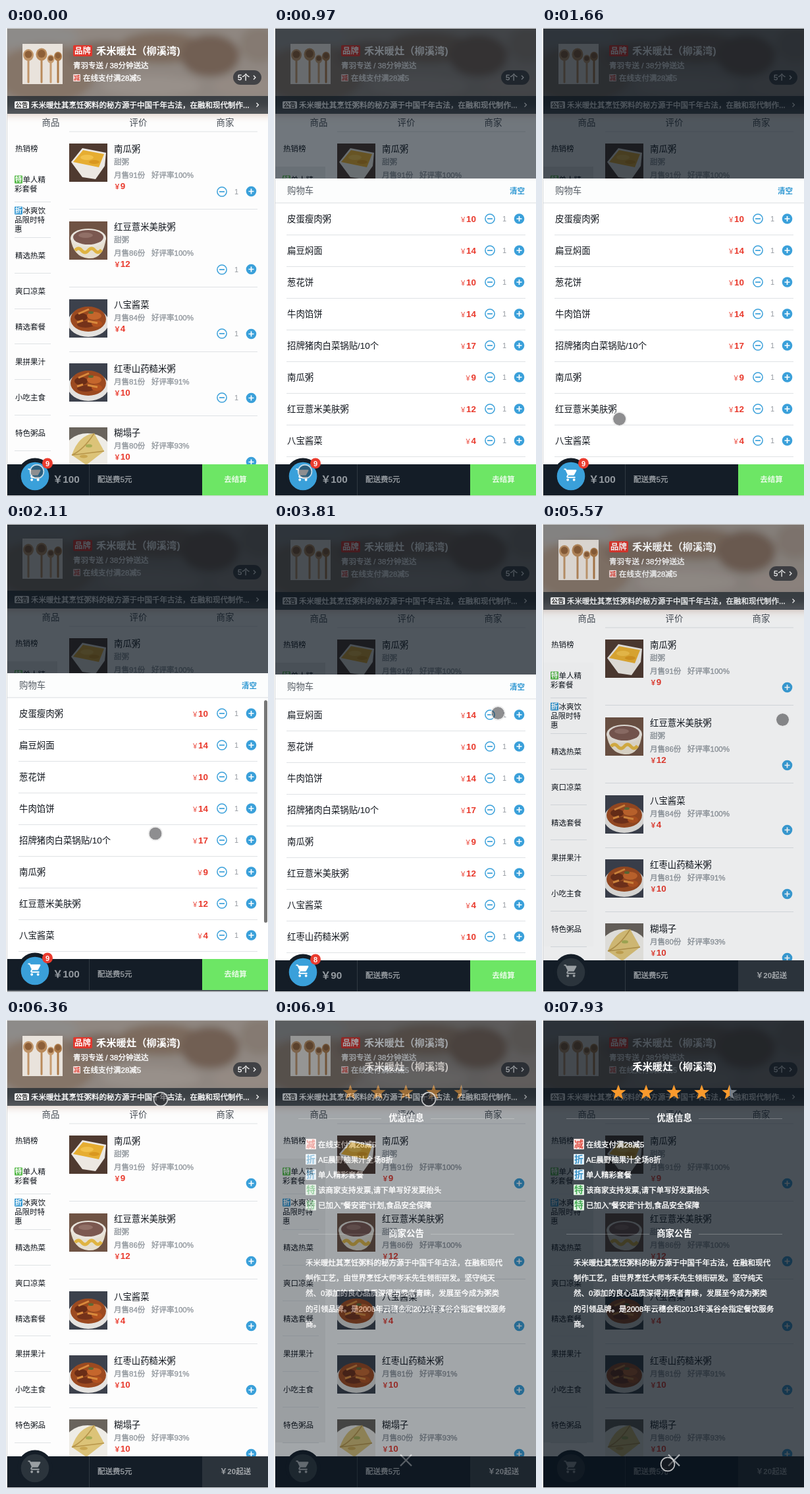
Animation, 398 px wide and 709 px high, one loop 7990 ms. Source, as an HTML page:

```html
<!DOCTYPE html>
<html lang="zh-CN">
<head>
<meta charset="utf-8">
<title>点餐购物车</title>
<style>
html,body{margin:0;width:100%;height:100%;overflow:hidden;background:#fff}
svg{display:block;width:100vw;height:100vh}
text{font-family:"Liberation Sans","Noto Sans CJK SC","Noto Sans CJK",sans-serif;white-space:pre}
</style>
</head>
<body>
<svg id="stage" viewBox="0 0 398 709"></svg>
<script>
const LOOP = 7990;
const BLUE = '#3aa0da', RED = '#e93a2d', INK = '#10151c', GREY = '#93999f', BAR = '#141d27';
const S = 11.5, M = 13.4, L = 15.3;
const SHOP = '禾米暖灶', NAME = SHOP + '（柳溪湾)';

// y is the vertical middle of the glyphs; weight 500 is thickened by a thin outline
const text = (x, y, str, size, fill, weight = 400, extra = '') =>
  `<text x="${x}" y="${(y + size * .37).toFixed(2)}" font-size="${size}" fill="${fill}" font-weight="${weight}" ${weight === 500 ? `stroke="${fill}" stroke-width=".38"` : ''} ${extra}>${str}</text>`;
const mid = (x, y, str, size, fill, weight) => text(x, y, str, size, fill, weight, 'text-anchor="middle"');
const rect = (x, y, w, h, fill, extra = '') => `<rect x="${x}" y="${y}" width="${w}" height="${h}" fill="${fill}" ${extra}/>`;
const line = (x1, x2, y, stroke = '#dfe2e5') => `<path d="M${x1} ${y + .5}H${x2}" stroke="${stroke}"/>`;
const disc = (x, y, r, fill, extra = '') => `<circle cx="${x}" cy="${y}" r="${r}" fill="${fill}" ${extra}/>`;
const oval = (x, y, rx, ry, fill, extra = '') => `<ellipse cx="${x}" cy="${y}" rx="${rx}" ry="${ry}" fill="${fill}" ${extra}/>`;
const group = (id, body, extra = '') => `<g id="${id}" ${extra}>${body}</g>`;
const chevron = (x, y) => `<path d="M${x} ${y - 3}l3 3-3 3" fill="none" stroke="#fff" stroke-width="1.2"/>`;

const plus = y => disc(372.5, y, 7.8, BLUE) + `<path d="M368.5 ${y}h8M372.5 ${y - 4}v8" stroke="#fff" stroke-width="1.7"/>`;
const minus = y => disc(328, y, 7.1, 'none', `stroke="${BLUE}" stroke-width="1.5"`) +
  `<path d="M324 ${y}h8" stroke="${BLUE}" stroke-width="1.7"/>` + mid(350, y, '1', 11, GREY);
const price = (x, y, n, anchor = 'start', weight = 700) =>
  text(x, y, `<tspan font-size="9.8" font-weight="${weight}">￥</tspan>${n}`, M, RED, 700, `text-anchor="${anchor}"`);
const tag = (x, y, size, ch, fill, ink) => rect(x, y, size, size, fill, 'rx="1"') + mid(x + size / 2, y + size / 2, ch, size * .86, ink, 700);

function spoons() {
  const spoon = (x, y, r, c) => `<path d="M${x} ${y}V82" stroke="${c}" stroke-width="3" stroke-linecap="round"/>` +
    oval(x, y, r, r + 1, c) + oval(x, y - 1, r * .68, r * .7, '#8d5f38');
  return rect(25, 24, 61, 61, '#e9e3dc') + spoon(34, 41, 8, '#c09468') + spoon(54, 40, 8.5, '#b98a5b') +
    spoon(68, 47, 5.5, '#c79c70') + spoon(79, 43, 6, '#ad7a48');
}

function header() {
  const blobs = [[30, 12, 80, 18, '#8d8b89'], [60, 70, 75, 45, '#857568'], [150, 42, 55, 22, '#78685d'], [235, 30, 65, 24, '#7c6a5d'],
    [310, 42, 45, 32, '#715f53'], [220, 88, 75, 16, '#98908a'], [385, 25, 30, 28, '#857a72'], [365, 88, 50, 14, '#948a83']];
  return `<g filter="url(#soft)">` + rect(-20, -20, 440, 144, '#8f8781') + rect(-20, 122, 440, 11, '#e6d6cd') +
    blobs.map(b => oval(...b)).join('') + '</g>' + spoons() +
    rect(102, 26, 29, 17, '#e0372d', 'rx="2"') + mid(116.5, 34.5, '品牌', 12.4, '#fff', 700) +
    text(137, 34.5, NAME, L, '#fff', 700) +
    text(102, 57, '青羽专送 / 38分钟送达', S, '#fff', 500) +
    tag(102, 70, 11, '减', '#f3dedb', '#e0483c') + text(117, 76, '在线支付满28减5', S, '#fff', 500) +
    rect(345, 64, 43, 22, '#07111b', 'rx="11" opacity=".58"') + text(352, 75, '5个', S, '#fff', 500) + chevron(376, 75) +
    rect(2, 103, 396, 27, '#1b242d', 'opacity=".72"') + rect(13, 111, 22, 11, '#f4f4f4', 'rx="1.5"') + mid(24, 116.5, '公告', 9.4, '#333', 700) +
    text(38, 116.5, SHOP + '其烹饪粥料的秘方源于中国千年古法，在融和现代制作...', S, '#fff', 500) + chevron(380.5, 116.5);
}

const pictures = {
  pumpkin: () => rect(0, 0, 58, 58, '#4f3a30') + `<path d="M3 28L20 7 56 14 54 34 40 54 20 51Z" fill="#ece8e2"/>` +
    `<path d="M6 28L21 10 53 16 45 36Z" fill="#e6ad31"/>` + oval(27, 21, 10, 4, '#f2c14a') + oval(38, 28, 8, 3, '#d9971f'),
  bean: () => rect(0, 0, 58, 58, '#6f5344') + `<path d="M2 25Q6 54 29 56T56 25Z" fill="#e6dfd0"/>` + oval(29, 25, 27, 14, '#e9e4dc') +
    oval(29, 24, 23, 11, '#7b5850') + oval(25, 21, 11, 4, '#917067') + `<path d="M9 44q5-6 10 0t10 0 10 0 10-1" fill="none" stroke="#dfb443" stroke-width="5"/>`,
  stew: () => rect(0, 0, 58, 58, '#3c414c') + oval(29, 35, 31, 22, '#e4e2df') + oval(29, 30, 27, 19, '#9c4a20') +
    oval(18, 27, 10, 6, '#6a2d17') + oval(38, 25, 11, 6, '#c5662c') + oval(25, 38, 13, 5, '#74321a') + oval(42, 37, 8, 5, '#b3521f') +
    `<path d="M14 22l16-7M28 33l15 3M12 35l9-3" stroke="#d98a3c" stroke-width="3"/>` + oval(33, 20, 4, 2, '#5d6b35'),
  pancake: () => rect(0, 0, 58, 58, '#69635c') + oval(28, 40, 37, 31, '#eeece6') + `<path d="M4 42Q14 12 38 9L53 36 26 57Z" fill="#dcc378"/>` +
    `<path d="M4 42Q22 34 38 9M4 42L53 36" fill="none" stroke="#b7954a" stroke-width="1.5"/>` + oval(30, 28, 5, 2.5, '#a7ad55') + oval(22, 44, 6, 2.5, '#c9a651')
};
const foods = [
  [175, '南瓜粥', '甜粥', 91, 100, 9, 'pumpkin'], [293, '红豆薏米美肤粥', '甜粥', 86, 100, 12, 'bean'],
  [411, '八宝酱菜', '', 84, 100, 4, 'stew'], [508, '红枣山药糙米粥', '', 81, 91, 10, 'stew'], [605, '糊塌子', '', 80, 93, 10, 'pancake']];
const foodRow = ([y, name, desc, sold, rate, cost, pic]) => {
  const d = desc ? 20 : 0;
  return `<svg x="96" y="${y}" width="58" height="58" style="width:58px;height:58px">${pictures[pic]()}</svg>` + text(164, y + 8.5, name, M, INK) +
    (desc && text(164, y + 27.5, desc, S, GREY, 500)) + text(164, y + 27.5 + d, `月售${sold}份`, S, GREY, 500) +
    text(221, y + 27.5 + d, `好评率${rate}%`, S, GREY, 500) + price(164, y + 44.5 + d, cost) + plus(y + 52.5 + d) + line(96, 382, y + 79 + d);
};

function sidebar() {
  const plain = ['精选热菜', '爽口凉菜', '精选套餐', '果拼果汁', '小吃主食', '特色粥品'];
  const t = (x, y, s) => text(x, y, s, S, INK);
  return group('shade', rect(2, 210, 76, 430, BAR)) + t(14, 183, '热销榜') +
    tag(13, 223.5, 12, '特', '#56b949', '#fff') + t(25.5, 230, '单人精') + t(13, 244, '彩套餐') + line(13, 68, 263) +
    tag(13, 270.5, 12, '折', '#3a9bd3', '#fff') + t(25.5, 277, '冰爽饮') + t(13, 291, '品限时特') + t(13, 304.5, '惠') + line(13, 68, 317) +
    plain.map((s, i) => t(14, 345 + i * 53.7, s) + line(13, 68, Math.round(371 + i * 53.7))).join('');
}

const order = [['皮蛋瘦肉粥', 10], ['扁豆焖面', 14], ['葱花饼', 10], ['牛肉馅饼', 14], ['招牌猪肉白菜锅贴/10个', 17],
  ['南瓜粥', 9], ['红豆薏米美肤粥', 12], ['八宝酱菜', 4], ['红枣山药糙米粥', 10]];
const popup = () => rect(2, 228, 396, 433, '#fff') + rect(2, 228, 396, 37, '#fcfdfd') + text(20, 246, '购物车', M, '#555c64') +
  text(358, 247, '清空', S, '#2d97d2', 700) + line(2, 398, 264.5, '#d9dde1') +
  group('rows', order.map(([name, cost], i) => {
    const y = 289 + i * 48;
    return '<g>' + text(20, y, name, M, INK) + price(307, y, cost, 'end', 400) + minus(y) + plus(y) + line(19, 382, y + 24) + '</g>';
  }).join(''));

const cart = 'M7 18c-1.1 0-2 .9-2 2s.9 2 2 2 2-.9 2-2-.9-2-2-2zM1 2v2h2l3.6 7.6-1.35 2.45c-.16.28-.25.6-.25.95 0 1.1.9 2 2 2h12v-2H7.4c-.14 0-.25-.1-.25-.25l.03-.12.9-1.63h7.45c.75 0 1.4-.4 1.75-1l3.6-6.5A1 1 0 0 0 20 4H5.2l-.94-2H1zm16 16c-1.1 0-2 .9-2 2s.9 2 2 2 2-.9 2-2-.9-2-2-2z';
const bar = () => rect(2, 661, 396, 47, BAR) + disc(44, 678, 26.5, BAR) + disc(44, 679, 21.3, BLUE, 'id="cup"') +
  `<path id="cart" transform="translate(32.5 665.5) scale(.95)" d="${cart}"/>` +
  group('badge', disc(63, 659.5, 8, '#ea3b2e') + mid(63, 659.5, '<tspan id="count"></tspan>', 11, '#fff', 700)) +
  text(71, 683.5, '<tspan id="total"></tspan>', L, '#959ba1', 700) + `<path d="M126.5 661v47" stroke="#303942"/>` +
  text(139, 684, '配送费5元', S, '#9a9fa4', 500) +
  rect(298, 661, 100, 47, '#2b333b', 'id="payBox"') + mid(348.5, 684, '<tspan id="pay"></tspan>', S, '#fff', 700);

function star(x, y, r) {
  let d = '';
  for (let i = 0; i < 10; i++) {
    const a = i * Math.PI / 5, q = i % 2 ? r * .42 : r;
    d += (i ? 'L' : 'M') + (x + q * Math.sin(a)).toFixed(1) + ' ' + (y - q * Math.cos(a)).toFixed(1);
  }
  return d + 'Z';
}
function detail() {
  const white = (x, y, s) => text(x, y, s, S, '#fff', 500);
  const section = (y, s) => mid(201, y, s, M, '#fff', 700) + line(37, 163, y + 1, '#ffffff40') + line(238, 365, y + 1, '#ffffff40');
  const kinds = {减: ['#f8e3e1', '#e0483c'], 折: ['#e2f0f8', '#3a93c8'], 特: ['#e2f4e4', '#45ad55']};
  const offers = [['减', '在线支付满28减5'], ['折', 'AE晨野柚果汁全场8折'], ['折', '单人精彩套餐'],
    ['特', '该商家支持发票,请下单写好发票抬头'], ['特', '已加入"餐安诺"计划,食品安全保障']];
  const notice = [SHOP + '其烹饪粥料的秘方源于中国千年古法，在融和现代', '制作工艺，由世界烹饪大师岑禾先生领衔研发。坚守纯天',
    '然、0添加的良心品质深得消费者青睐，发展至今成为粥类', '的引领品牌。是2008年云穗会和2013年溪谷会指定餐饮服务', '商。'];
  return rect(2, 1, 396, 707, '#07111b', 'opacity=".73"') + mid(201, 70.5, NAME, L, '#fff', 700) +
    [0, 1, 2, 3, 4].map(i => `<path d="${star(116 + i * 42.2, 110, 12)}" fill="${i < 4 ? '#f99a2d' : 'url(#half)'}"/>`).join('') +
    section(148, '优惠信息') +
    offers.map(([k, s], i) => tag(48, 180 + i * 23.1, 16, k, ...kinds[k]) + white(67, 188.5 + i * 23.1, s)).join('') +
    section(323, '商家公告') + notice.map((s, i) => white(48, 368 + i * 23.1, s)).join('') +
    `<path d="M192 658.5l17 17M209 658.5l-17 17" stroke="#fff" stroke-opacity=".6" stroke-width="2.2"/>`;
}

document.getElementById('stage').innerHTML =
  `<defs><filter id="soft" x="-10%" y="-20%" width="120%" height="140%"><feGaussianBlur stdDeviation="6"/></filter>
  <linearGradient id="half"><stop offset=".5" stop-color="#f99a2d"/><stop offset=".5" stop-color="#777e86"/></linearGradient>
  <clipPath id="view">${rect(2, 1, 396, 707, '#000')}</clipPath></defs>` +
  rect(0, 0, 398, 709, '#fff') + `<path d="M398 .5H1.5V708.5H398" fill="none" stroke="#d4d6d8"/>` +
  `<g clip-path="url(#view)">` + group('page',
    rect(2, 1, 396, 707, '#fdfdfd') + header() +
    mid(68, 143, '商品', M, '#454c54') + mid(201, 143, '评价', M, '#454c54') + mid(333, 143, '商家', M, '#454c54') + line(96, 382, 156.5) +
    sidebar() + foods.map(foodRow).join('') + group('steppers', [248, 366, 463, 560].map(minus).join('')) +
    rect(2, -4, 396, 716, '#07111b', 'id="mask"') + group('popup', popup()) +
    rect(392, 269, 5, 337, '#777', 'id="thumb" rx="2.5"') + bar() + group('detail', detail())) + '</g>' +
  group('cursor', disc(0, 0, 9.6, '#1e1e22', 'fill-opacity=".5"') + disc(0, 0, 10.4, 'none', 'stroke="#e8e8e8" stroke-opacity=".8" stroke-width="1.7"'));

const el = id => document.getElementById(id);
const set = (id, key, v) => el(id).setAttribute(key, v);
const show = (id, on) => set(id, 'display', on ? 'inline' : 'none');
const ramp = (t, from, span) => Math.min(1, Math.max(0, (t - from) / span));

// CSS "ease": cubic-bezier(.25,.1,.25,1)
function ease(x) {
  let lo = 0, hi = 1, u = x;
  for (let i = 0; i < 18; i++) {
    u = (lo + hi) / 2;
    if (.75 * u * (1 - u) + u ** 3 < x) lo = u; else hi = u;
  }
  return x <= 0 ? 0 : x >= 1 ? 1 : .3 * u * (1 - u) ** 2 + 3 * u * u * (1 - u) + u ** 3;
}

// pointer stops: start, end of the move, x, y
const moves = [[1460, 1930, 227, 469], [2550, 3160, 341, 286], [3770, 4040, 329, 294], [4830, 5040, 365.5, 296.5],
  [5590, 5790, 277, 257], [5970, 6360, 235, 120], [6960, 7480, 190, 599], [7490, 7930, 191, 673]];
function pointer(t) {
  let x = 47, y = 672;
  for (const [a, b, px, py] of moves) {
    const p = ramp(t, a, b - a), k = p * p * (3 - 2 * p);
    x += (px - x) * k;
    y += (py - y) * k;
  }
  return `translate(${x.toFixed(2)} ${y.toFixed(2)})`;
}

function draw(t) {
  const cleared = t >= 5280, gone = t >= 4340 ? 2 : t >= 3460 ? 1 : 0;
  const left = order.slice(gone);
  const dim = .7 * (cleared ? 1 - ease(ramp(t, 5250, 520)) : ease(ramp(t, 710, 520)));
  const info = ease(ramp(t, 6680, 780));
  const slide = 433 * (1 - ease(ramp(t, 700, 260)));

  set('page', 'transform', `translate(0 ${t < 2290 ? -2 * ramp(t, 1900, 120) : 0})`);
  set('mask', 'opacity', dim);
  set('shade', 'opacity', .09 * Math.max(dim / .7, info));
  show('popup', t > 700 && !cleared);
  set('popup', 'transform', `translate(0 ${slide + (gone === 2 ? 34 : 0)})`);
  set('rows', 'transform', `translate(0 ${-48 * gone})`);
  [...el('rows').children].forEach((row, i) => row.setAttribute('display', i < gone ? 'none' : 'inline'));
  set('thumb', 'opacity', ramp(t, 1900, 80) * (1 - ramp(t, 2600, 300)));

  show('steppers', !cleared);
  show('badge', !cleared);
  el('count').textContent = left.length;
  el('total').textContent = cleared ? '' : '￥' + left.reduce((sum, item) => sum + item[1], 0);
  el('pay').textContent = cleared ? '￥20起送' : '去结算';
  set('pay', 'fill', cleared ? '#a3a7ab' : '#e9fbe7');
  set('payBox', 'fill', cleared ? '#2b333b' : '#6de665');
  set('cup', 'fill', cleared ? '#2b343c' : BLUE);
  set('cart', 'fill', cleared ? '#9a9fa3' : '#fff');
  show('detail', info > 0);
  set('detail', 'opacity', info);
  set('cursor', 'transform', pointer(t));
}

function tick() {
  draw(performance.now() % LOOP);
  requestAnimationFrame(tick);
}
tick();
</script>
</body>
</html>
```
